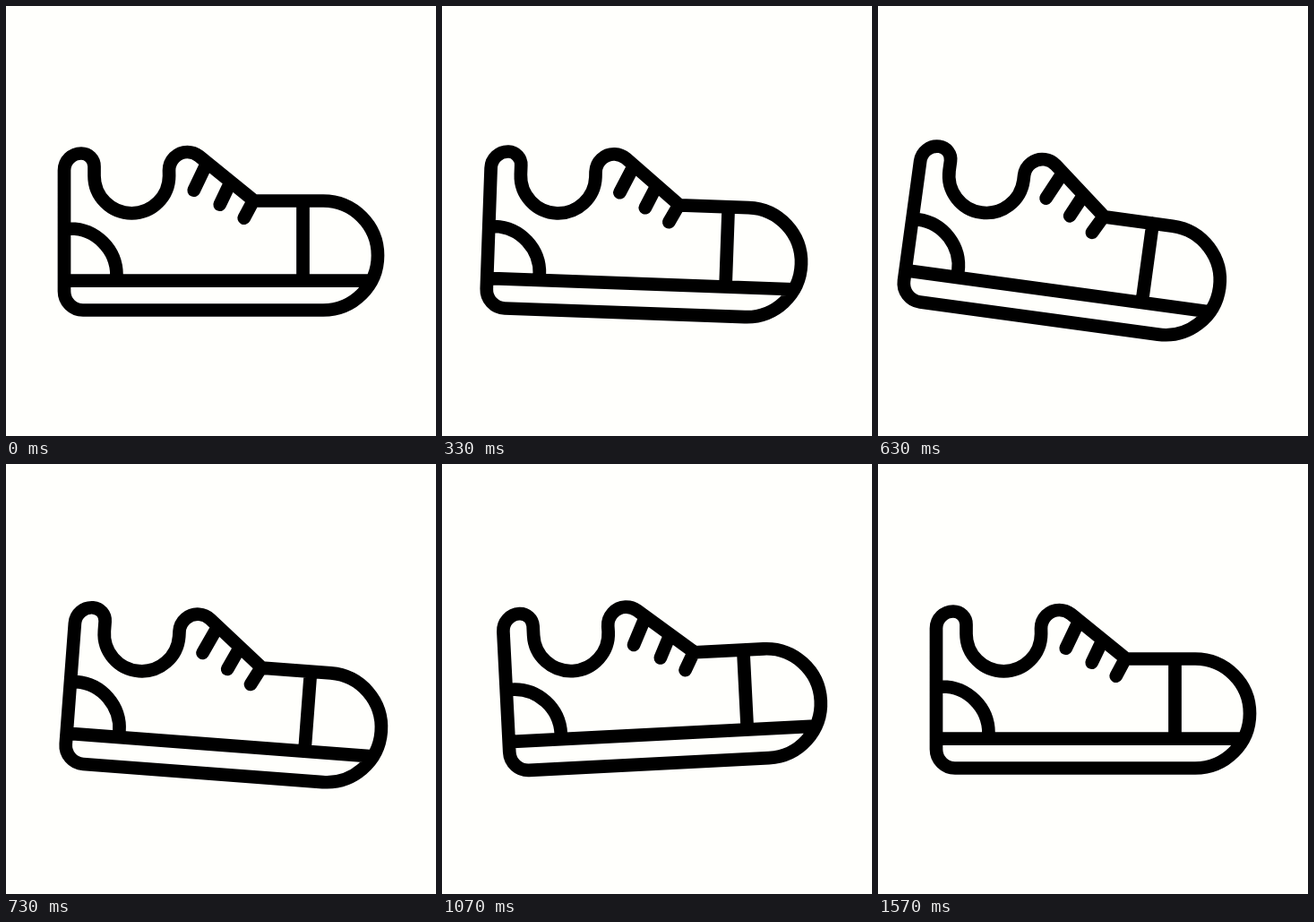
These frames come from a looping animation (480x480 px, 1.61 s). An HTML page with a canvas:

```html
<!DOCTYPE html>
<html lang="en">
<head>
<meta charset="utf-8">
<title>Sneaker</title>
<style>
  html, body { margin: 0; width: 100%; height: 100%; overflow: hidden; background: #fffffc; }
  canvas { display: block; width: 100vw; height: 100vh; }
</style>
</head>
<body>
<canvas id="stage" width="480" height="480"></canvas>
<script>
const ctx = document.getElementById('stage').getContext('2d');
const LOOP = 1610;
const PIVOT = { x: 138, y: 119 };

// [ms, shift in px, tilt in degrees]
const poses = [
  [0, 0, 0],
  [160, -0.8, 0.15],
  [330, -8.1, 2.06],
  [470, -19.6, 8.3],
  [550, -23, 9.2],
  [730, 16.5, 4.3],
  [840, 31, 0.6],
  [1070, 0, -2.93],
  [1330, 0, 1.07],
  [1570, 0, 0],
  [LOOP, 0, 0]
];

// Monotone cubic curve through one column of the poses
function makeTrack(column) {
  const slope = i => (poses[i + 1][column] - poses[i][column]) / (poses[i + 1][0] - poses[i][0]);
  const tangent = i => {
    if (i === 0 || i === poses.length - 1) return 0;
    const a = slope(i - 1), b = slope(i);
    return a * b > 0 ? 2 * a * b / (a + b) : 0;
  };
  const tangents = poses.map((_, i) => tangent(i));
  return time => {
    let i = 0;
    while (i < poses.length - 2 && time >= poses[i + 1][0]) i++;
    const span = poses[i + 1][0] - poses[i][0];
    const u = (time - poses[i][0]) / span;
    const v = 1 - u;
    return v * v * (1 + 2 * u) * poses[i][column]
      + u * u * (3 - 2 * u) * poses[i + 1][column]
      + span * u * v * (v * tangents[i] - u * tangents[i + 1]);
  };
}

const shiftAt = makeTrack(1);
const tiltAt = makeTrack(2);

function buildShoe() {
  const shoe = new Path2D();
  const line = (x1, y1, x2, y2) => { shoe.moveTo(x1, y1); shoe.lineTo(x2, y2); };

  // Outline: heel tab, collar, tongue, toe, sole
  shoe.moveTo(65, 183.5);
  shoe.arc(84, 183.5, 19, Math.PI, -Math.PI / 2);
  shoe.arc(84, 179, 14.5, -Math.PI / 2, 0);
  shoe.arc(140.3, 189.5, 41.8, Math.PI, 0, true);
  shoe.arc(202.5, 183.5, 20.5, Math.PI, -0.89);
  shoe.lineTo(277, 217.5);
  shoe.arc(354, 278.5, 61, -Math.PI / 2, Math.PI / 2);
  shoe.arc(86, 318.5, 21, Math.PI / 2, Math.PI);
  shoe.closePath();

  line(65, 306.7, 407, 306.7);
  line(331.5, 217.5, 331.5, 306.7);

  // Heel patch
  shoe.moveTo(65, 248.5);
  shoe.lineTo(71.5, 248.5);
  shoe.arc(71.5, 300.5, 52, -Math.PI / 2, 0);
  shoe.lineTo(123.5, 306.7);

  // Laces
  line(222.5, 179, 209.7, 205.7);
  line(250, 198, 238.7, 221.7);
  line(276, 217.5, 265.7, 236.7);
  return shoe;
}

const shoe = buildShoe();

function draw(now) {
  const time = now % LOOP;
  ctx.fillStyle = '#fffffc';
  ctx.fillRect(0, 0, 480, 480);
  ctx.save();
  ctx.translate(PIVOT.x + shiftAt(time), PIVOT.y);
  ctx.rotate(tiltAt(time) * Math.PI / 180);
  ctx.translate(-PIVOT.x, -PIVOT.y);
  ctx.strokeStyle = '#000';
  ctx.lineWidth = 14.7;
  ctx.lineCap = 'round';
  ctx.lineJoin = 'round';
  ctx.stroke(shoe);
  ctx.restore();
}

let start;
function tick(now) {
  start ??= now;
  draw(Math.max(0, now - start));
  requestAnimationFrame(tick);
}
draw(0);
requestAnimationFrame(tick);
</script>
</body>
</html>
```
